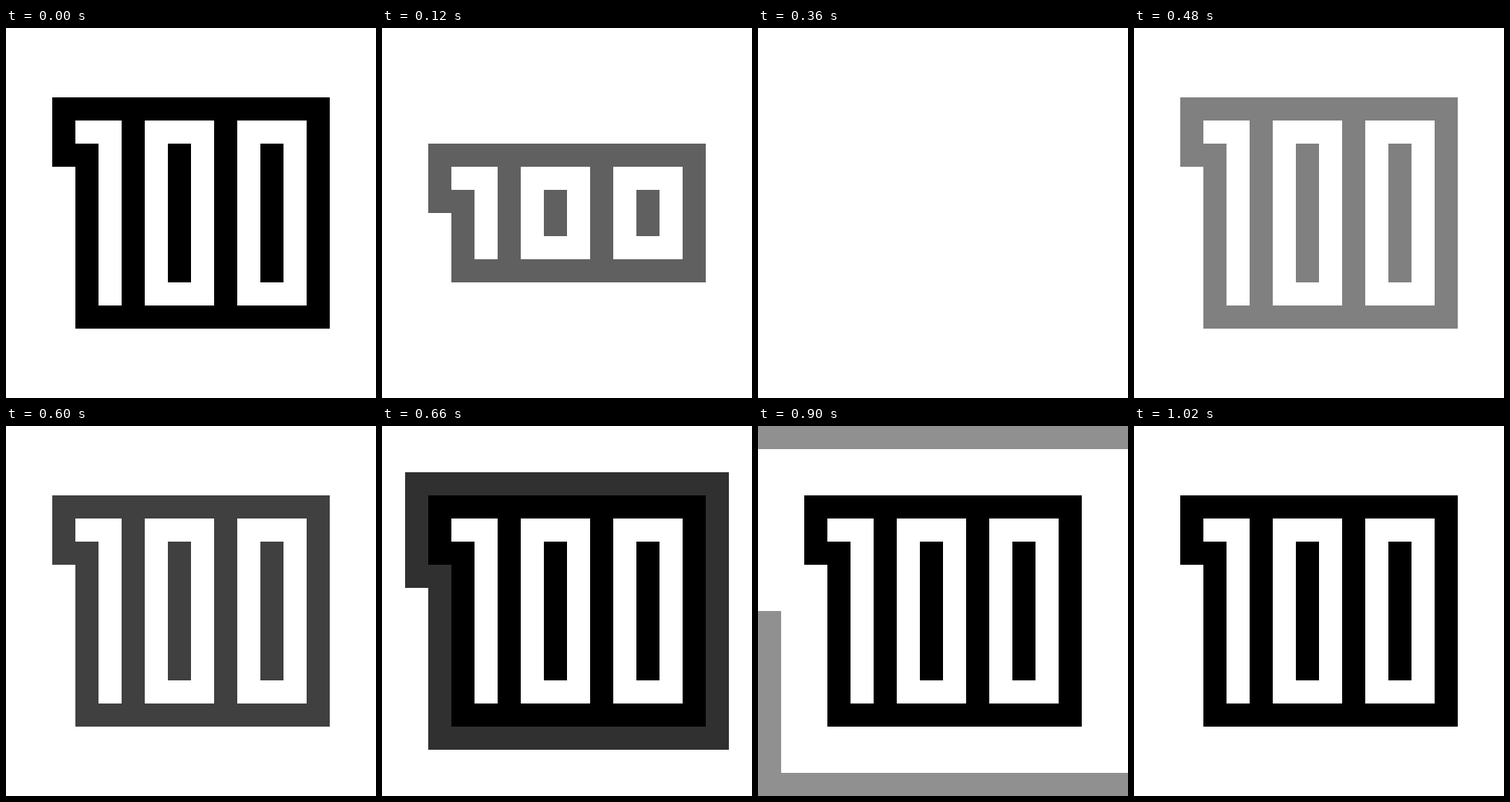
An HTML page with a canvas for the animation above (1.14 s loop, 480x480 px).

```html
<!DOCTYPE html>
<html lang="en">
<head>
<meta charset="utf-8">
<title>100</title>
<style>
  html, body { margin: 0; width: 100%; height: 100%; overflow: hidden; background: #fff; }
  canvas { display: block; }
</style>
</head>
<body>
<canvas id="stage" width="480" height="480"></canvas>
<script>
const LOOP = 1140, TICK = 60, SHADE = 48;
const ctx = document.getElementById('stage').getContext('2d');
ctx.scale(30, 30); // 16 x 16 grid cells

function box(shade, x, y, w, h) {
  ctx.fillStyle = `rgb(${shade}, ${shade}, ${shade})`;
  ctx.fillRect(x, y, w, Math.max(0, h));
}

// Notched badge silhouette, h rows tall, grown by d cells on every side
function badge(shade, h, d = 0) {
  const top = 8 - h / 2 - d;
  box(shade, 2 - d, top, 12 + 2 * d, Math.min(3, h) + 2 * d);
  box(shade, 3 - d, top, 11 + 2 * d, h + 2 * d);
}

function hundred(shade, h = 10) {
  const top = 9 - h / 2, tall = h - 2;
  badge(shade, h);
  if (tall <= 0) return;
  box(255, 3, top, 2, 1);
  box(255, 4, top, 1, tall);
  for (const x of [6, 10]) {
    box(255, x, top, 3, tall);
    box(shade, x + 1, top + 1, 1, tall - 2);
  }
}

function draw(t) {
  const step = Math.floor(t / TICK);
  box(255, 0, 0, 16, 16);
  if (step < 6) {
    // squash and fade out
    hundred(step * SHADE, Math.max(1, 10 - 2 * step));
  } else if (step < 11) {
    // fade in at full height
    if (step > 6) hundred(160 - 32 * (step - 7));
  } else {
    // an outline spreads one cell every two ticks
    const d = Math.floor((step - 11) / 2) + 1;
    if (d < 4) {
      badge(d * SHADE, 10, d);
      badge(255, 10, d - 1);
    }
    hundred(0);
  }
}

const start = performance.now();
function frame() {
  draw((performance.now() - start) % LOOP);
  requestAnimationFrame(frame);
}
frame();
</script>
</body>
</html>
```
